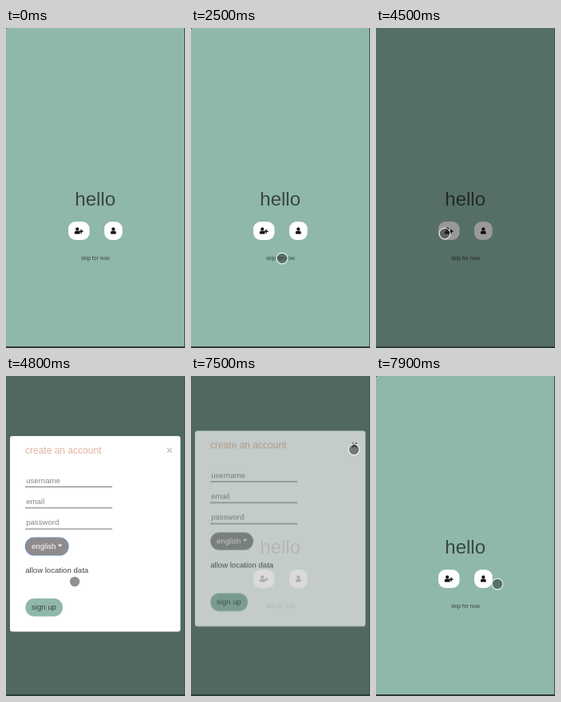
An HTML page with a canvas for the animation above (8000 ms loop, 224 by 400 pixels).

```html
<!DOCTYPE html>
<html lang="en">
<head>
<meta charset="utf-8">
<title>Sign-up flow</title>
<style>
html, body { margin: 0; width: 100%; height: 100%; overflow: hidden; background: #8fb8a8; }
canvas { display: block; width: 224px; height: 400px; }
</style>
</head>
<body>
<canvas id="stage"></canvas>
<script>
const W = 224, H = 400, LOOP = 8000, STEP = 100;
const GREEN = '#8fb8a8', DIM = 0.44, SLIDE = 28;
const SANS = '"Liberation Sans", Arial, sans-serif';
const ratio = window.devicePixelRatio || 1;

function prepare(canvas) {
  canvas.width = W * ratio;
  canvas.height = H * ratio;
  const c = canvas.getContext('2d');
  c.scale(ratio, ratio);
  return c;
}
const ctx = prepare(document.getElementById('stage'));
const layer = document.createElement('canvas');
const card = prepare(layer);

// Pointer stops: time, x, y
const stops = [
  [800, 101, 386], [900, 76, 332], [1500, 76, 331], [1700, 71, 324],
  [2000, 88, 306], [2400, 115, 290], [2500, 114, 288], [3100, 114, 288],
  [3400, 126, 280], [3700, 109, 265], [4000, 87, 257], [4100, 86, 257],
  [5200, 86, 257], [5600, 115, 252], [6000, 140, 257], [6100, 152, 200],
  [6400, 180, 128], [6800, 204, 92], [7500, 204, 92], [7900, 152, 260]
];

const progress = (t, from, to) => Math.min(1, Math.max(0, (t - from) / (to - from)));
const easeOut = p => 1 - (1 - p) ** 2;

function box(c, x, y, w, h, r, fill) {
  c.beginPath();
  c.roundRect(x, y, w, h, r);
  c.fillStyle = fill;
  c.fill();
}

function disc(c, x, y, r, fill) {
  c.beginPath();
  c.arc(x, y, r, 0, Math.PI * 2);
  c.fillStyle = fill;
  c.fill();
}

function label(c, str, x, y, size, fill, align = 'left') {
  c.font = `${size}px ${SANS}`;
  c.textAlign = align;
  c.fillStyle = fill;
  c.fillText(str, x, y);
}

function person(x, y) {
  disc(ctx, x, y - 2.1, 2.1, '#151515');
  box(ctx, x - 3.4, y + 0.2, 6.8, 4, [2.2, 2.2, 0.8, 0.8], '#151515');
}

function drawHome() {
  ctx.fillStyle = GREEN;
  ctx.fillRect(0, 0, W, H);
  label(ctx, 'hello', 111.7, 222, 24, '#3b4642', 'center');
  box(ctx, 78, 242, 26.5, 23, 9, '#fff');
  box(ctx, 123, 242, 22.7, 23, 9, '#fff');
  person(89.2, 253.4);
  box(ctx, 91.6, 253.5, 5, 1.4, 0.3, '#151515');
  box(ctx, 93.4, 251.7, 1.4, 5, 0.3, '#151515');
  person(134.3, 253.4);
  label(ctx, 'skip for now', 111.9, 289.5, 6.75, '#3b4642', 'center');
}

function drawCard(t) {
  const closing = t >= 7400;
  card.clearRect(0, 0, W, H);
  box(card, 5, 77, 213.3, 244.5, 3, '#fff');
  label(card, 'create an account', 24, 99, 12, '#e0b49d');

  ['username', 'email', 'password'].forEach((name, i) => {
    const y = 135.5 + i * 26.3;
    label(card, name, 25.2, y, 9.6, '#858585');
    card.fillStyle = '#7c7c7c';
    card.fillRect(24, y + 4.5, 109, 1.1);
  });

  box(card, 24.3, 204, 53.7, 22, 11, '#8f8c8b');
  if (!closing) {
    card.strokeStyle = '#7292b8';
    card.lineWidth = 1.2;
    card.stroke();
  }
  label(card, 'english', 32, 218, 9.6, '#fff');
  card.beginPath();
  card.moveTo(65, 212.4);
  card.lineTo(70.4, 212.4);
  card.lineTo(67.7, 215.2);
  card.fill();

  label(card, 'allow location data', 24.2, 248, 9.6, '#444');
  if (t >= 4900 && !closing) {
    box(card, 109, 232.5, 48, 23.5, 11.7, '#e2e2e2');
    disc(card, 123.8, 244.5, 4.6, '#fff');
  }

  box(card, 24.3, 280, 46.7, 22.5, 11.2, GREEN);
  label(card, 'sign up', 32, 294.3, 9.6, '#35443f');

  card.beginPath();
  for (const d of [-1, 1]) {
    card.moveTo(204.6 - 2.8, 94.8 - 2.8 * d);
    card.lineTo(204.6 + 2.8, 94.8 + 2.8 * d);
  }
  card.strokeStyle = closing ? '#2c2c2c' : '#c6c6c6';
  card.lineWidth = 1.7;
  card.stroke();
}

function drawModal(t) {
  const dim = DIM * (1 - (1 - progress(t, 4380, 4600)) ** 3) * (1 - progress(t, 7600, 7750));
  ctx.fillStyle = `rgba(0,0,0,${dim})`;
  ctx.fillRect(0, 0, W, H);

  const alpha = progress(t, 4580, 4730) * (1 - progress(t, 7450, 7600));
  if (!alpha) return;
  const shift = 1 - easeOut(progress(t, 4580, 4880)) + easeOut(progress(t, 7450, 7750));
  drawCard(t);
  ctx.globalAlpha = alpha;
  ctx.drawImage(layer, 0, -SLIDE * shift, W, H);
  ctx.globalAlpha = 1;
}

function drawPointer(t) {
  if (t < stops[0][0]) return;
  let i = stops.findIndex(s => s[0] > t);
  if (i < 0) i = stops.length - 1;
  const [t0, x0, y0] = stops[i - 1], [t1, x1, y1] = stops[i];
  const p = progress(t, t0, t1);
  const x = x0 + (x1 - x0) * p, y = y0 + (y1 - y0) * p;
  disc(ctx, x, y, 6.3, 'rgba(40,46,44,0.52)');
  ctx.beginPath();
  ctx.arc(x, y, 6.8, 0, Math.PI * 2);
  ctx.strokeStyle = 'rgba(255,255,255,0.75)';
  ctx.lineWidth = 1.2;
  ctx.stroke();
}

function drawEdges() {
  ctx.fillStyle = '#41544d';
  ctx.fillRect(223, 0, 1, H);
  ctx.fillStyle = '#2d3b37';
  ctx.fillRect(0, 398, W, 2);
  ctx.fillRect(0, 0, 1, 1);
}

function frame(now) {
  const t = Math.floor((now % LOOP) / STEP) * STEP;
  drawHome();
  drawModal(t);
  drawPointer(t);
  drawEdges();
  requestAnimationFrame(frame);
}
requestAnimationFrame(frame);
</script>
</body>
</html>
```
